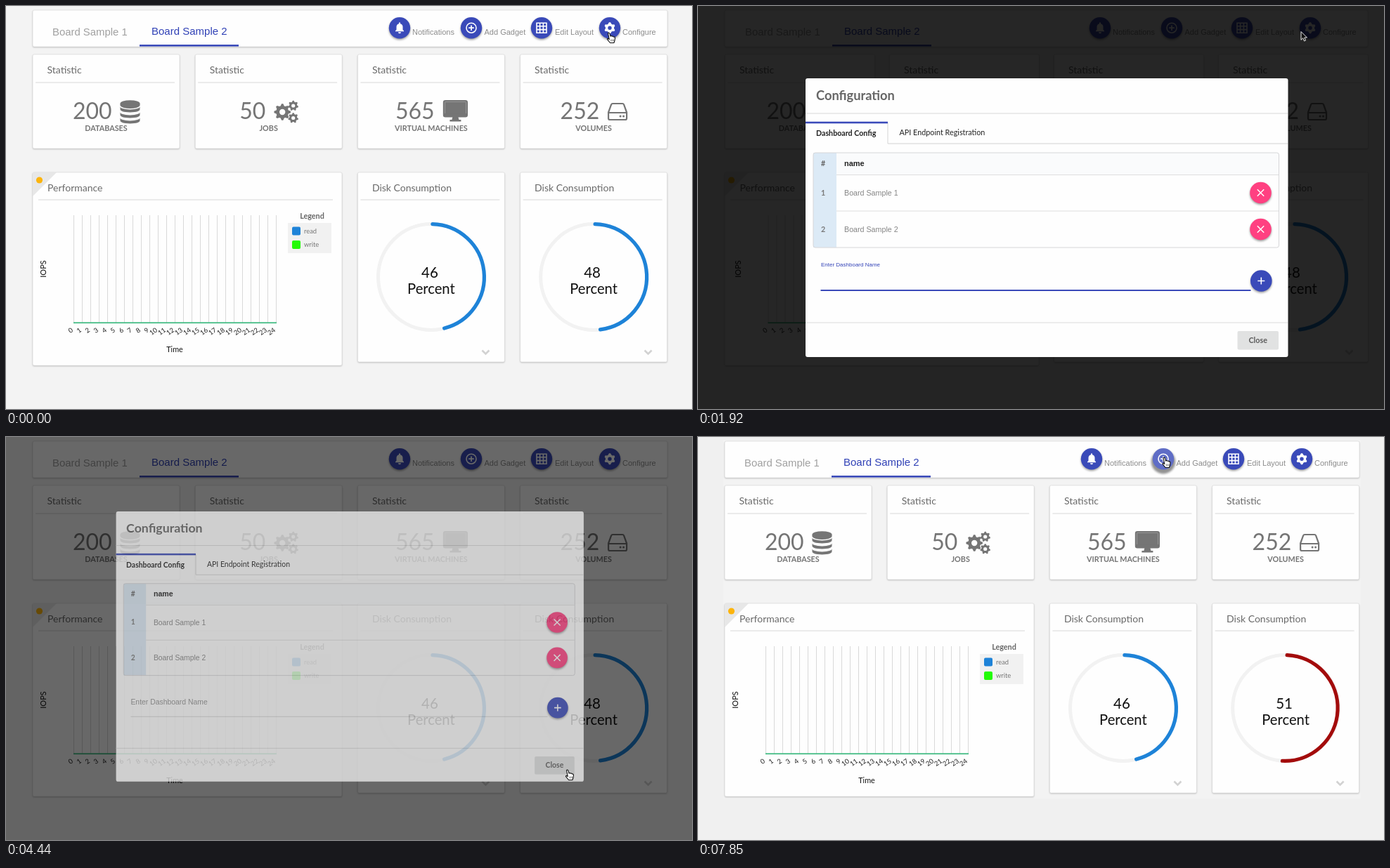
An HTML page for the animation above (8 s loop, 976x574 px).

```html
<!DOCTYPE html>
<html lang="en">
<head>
<meta charset="utf-8">
<title>Dashboard configuration</title>
<style>
html, body { margin: 0; width: 100%; height: 100%; overflow: hidden; background: #f3f3f3; }
svg { display: block; width: 976px; height: 574px; font-family: Lato, sans-serif; }
.sans { font-family: "Liberation Sans", Arial, sans-serif; }
</style>
</head>
<body>
<svg id="stage" viewBox="0 0 976 574"></svg>
<script>
const LOOP = 8000, TICK = 148.1;
const INDIGO = '#3a4ab9', PINK = '#ff4081', GREY = '#757575', BLUE = '#1e83d8';
const stage = document.getElementById('stage');

const DEFS = `<defs>
  <filter id="soft" x="-50%" y="-50%" width="200%" height="200%"><feGaussianBlur stdDeviation="1.6"/></filter>
  <filter id="edge" x="-5%" y="-5%" width="110%" height="110%"><feGaussianBlur stdDeviation="0.8"/></filter>
</defs>`;

// shape helpers
const text = (x, y, s, size, fill, extra = '') =>
  `<text x="${x}" y="${y}" font-size="${size}" fill="${fill}" ${extra}>${s}</text>`;
const rect = (x, y, w, h, fill, extra = '') =>
  `<rect x="${x}" y="${y}" width="${w}" height="${h}" fill="${fill}" ${extra}/>`;
const disc = (x, y, r, fill, extra = '') =>
  `<circle cx="${x}" cy="${y}" r="${r}" fill="${fill}" ${extra}/>`;
const stroke = (d, color, width = 1, extra = '') =>
  `<path d="${d}" fill="none" stroke="${color}" stroke-width="${width}" ${extra}/>`;
const shape = (d, fill, extra = '') => `<path d="${d}" fill="${fill}" ${extra}/>`;
const at = (x, y, body) => `<g transform="translate(${x} ${y})">${body}</g>`;
const MID = 'text-anchor="middle"', BOLD = 'font-weight="700"', SANS = 'class="sans"';

function card(x, y, right, bottom) {
  const w = right - x, h = bottom - y;
  return rect(x, y + 1, w, h, '#000', 'rx="2" opacity=".25" filter="url(#edge)"') +
    rect(x, y, w, h, '#fefefe', 'rx="2" stroke="#dcdcdc" stroke-width=".7"');
}

function gear(x, y, r, teeth, hole, fill) {
  let d = '';
  for (let i = 0; i < teeth * 4; i++) {
    const a = (i - 0.5) / (teeth * 4) * 2 * Math.PI, q = i % 4 < 2 ? r : r * 0.76;
    d += (i ? 'L' : 'M') + (x + q * Math.sin(a)).toFixed(2) + ' ' + (y - q * Math.cos(a)).toFixed(2);
  }
  d += `ZM${x - hole} ${y}a${hole} ${hole} 0 1 0 ${2 * hole} 0a${hole} ${hole} 0 1 0 ${-2 * hole} 0Z`;
  return shape(d, fill, 'fill-rule="evenodd"');
}

// header
const BUTTONS = [
  [560, 578, 'Notifications', shape('M-6 5H6V4L4.5 2.5V-1.5C4.5-4 3-5.5 1-6V-7A1 1 0 0 0-1-7V-6C-3-5.5-4.5-4-4.5-1.5V2.5L-6 4ZM-2 6H2A2 2 0 0 1-2 6Z', '#fff')],
  [662, 680.5, 'Add Gadget', disc(0, 0, 7, 'none', 'stroke="#fff" stroke-width="1.6"') + stroke('M-3.8 0H3.8M0-3.8V3.8', '#fff', 1.7)],
  [762, 781, 'Edit Layout', stroke('M-7-7H7V7H-7ZM-2.4-7V7M2.4-7V7M-7-2.4H7M-7 2.4H7', '#fff', 1.6)],
  [859, 877, 'Configure', gear(0, 0, 8, 6, 2.7, '#fff')]
];

function roundButton(x, y, r, fill, icon, pressed) {
  const shadow = pressed ? disc(0, 4, r + 2, '#000', 'opacity=".42" filter="url(#soft)"')
    : disc(0, 1.8, r, '#000', 'opacity=".38" filter="url(#soft)"');
  return at(x, y, shadow + disc(0, 0, r, fill) + icon);
}

function headerBar(wide, pressed) {
  const dx = wide ? 12 : 0, tab = wide ? 1 : 0;
  let s = card(38, 6, wide ? 953 : 941, 58);
  s += text(66 + tab, 42, 'Board Sample 1', 14.9, '#a0a0a0', SANS);
  s += text(207 + tab, 41, 'Board Sample 2', 15, '#3041b6', SANS);
  s += rect(190 + tab, 55, 141, 2.6, INDIGO);
  BUTTONS.forEach(([x, tx, label, icon], i) => {
    s += roundButton(x + dx, 31.2, 15.2, pressed === i ? '#5f6dc6' : INDIGO, icon, pressed === i);
    s += text(tx + dx, 41, label, 11, '#8c8c8c', SANS);
  });
  return s;
}

// statistic cards; icons are placed from the card's centre
const database = [0, 1, 2].map(i => {
  const y = 143.5 + i * 8;
  return shape(`M20 ${y}q0 3 14 4q14-1 14-4v3.5q0 4-14 4.5q-14-.5-14-4.5Z`, GREY);
}).join('') + `<ellipse cx="34" cy="139" rx="14" ry="4.8" fill="${GREY}"/>` + shape('M20 139h28v3q-3 4-14 4t-14-4Z', GREY);
const cogs = gear(19.5, 151, 11.8, 8, 4.2, GREY) + gear(35, 142, 7.3, 7, 2.6, GREY) + gear(35, 159.5, 7.3, 7, 2.6, GREY);
const monitor = rect(18.2, 135.2, 32.6, 22, '#fefefe', `rx="2" stroke="${GREY}" stroke-width="2.6"`) +
  rect(18, 153, 33, 5, GREY) + rect(19.5, 136.5, 30, 17, GREY) + shape('M30.5 158h8l1 4h3v2.5h-16v-2.5h3Z', GREY);
const drive = stroke('M21 151.5L25 140.5Q25.5 139 27 139H41Q42.5 139 43 140.5L47 151.5V160Q47 162 45 162H23Q21 162 21 160ZM21 152H47', GREY, 2.2) +
  disc(38, 157, 1.5, GREY) + disc(42.5, 157, 1.5, GREY);
const STATS = [
  ['200', -47.5, 'DATABASES', database],
  ['50', -41.5, 'JOBS', cogs],
  ['565', -51, 'VIRTUAL MACHINES', monitor],
  ['252', -47.5, 'VOLUMES', drive]
];

function column(i, wide) {
  const x = wide ? 38.5 + 234 * i : 38 + 231.2 * i, w = wide ? 213 : 209;
  return { x, right: x + w, mid: x + w / 2 };
}

function statCard(i, wide) {
  const { x, right, mid } = column(i, wide), [value, vx, label, icon] = STATS[i];
  return card(x, 69, right, 203) + text(x + 20.5, 95.5, 'Statistic', 14, '#696969') +
    rect(x + 4, 108.5, right - x - 11, 1, '#d9d9d9') +
    text(mid + vx, 161, value, 32, GREY) + at(mid, 0, icon) +
    text(mid, 178, label, 10.8, GREY, MID + ' ' + BOLD);
}

function chartCard(wide) {
  const right = wide ? 485 : 478;
  let s = card(38, 237, right, 512) + shape('M38 237H72L38 271Z', '#e7e7e7') + disc(47.5, 248, 4.6, '#fcb40c');
  s += text(wide ? 59.5 : 59, 263.5, 'Performance', 14, '#696969') + rect(46, 275.5, right - 59, 1, '#d9d9d9');
  let chart = '';
  for (let h = 0; h <= 24; h++) {
    const x = 96 + 12 * h;
    chart += rect(x, 298, 1, 154, '#d9d9d9');
    chart += text(0, 0, h, 9.5, '#222', `text-anchor="end" transform="translate(${x} 463) rotate(-35)"`);
  }
  chart += rect(96, 450.3, 289, 1.8, '#45bd85');
  chart += text(240, 493, 'Time', 10.8, '#111', MID);
  chart += text(0, 0, 'IOPS', 11, '#111', MID + ' transform="translate(57 374.5) rotate(-90)"');
  chart += text(435.5, 302.5, 'Legend', 10.8, '#666', MID + ' ' + BOLD);
  chart += rect(401, 309, 62, 43, '#f1f1f1');
  [['read', BLUE], ['write', '#22fb05']].forEach(([label, color], i) => {
    chart += rect(407, 314.5 + 19.5 * i, 12, 12, color, 'rx="2"') + text(424, 324 + 19.3 * i, label, 9.4, '#777');
  });
  return s + at(wide ? 3.5 : 0, 0, chart);
}

function gaugeCard(i, wide, percent, color) {
  const { x, right, mid } = column(i, wide), r = 75.4, a = percent / 50 * Math.PI;
  const ex = mid + r * Math.sin(a), ey = 386 - r * Math.cos(a);
  const arc = `M${mid + 2} 310.6A${r} ${r} 0 ${percent > 50 ? 1 : 0} 1 ${ex} ${ey}`;
  return card(x, 237, right, 507) + text(x + 20.5, 263.5, 'Disk Consumption', 14, '#696969') +
    rect(x + 4, 275.5, right - x - 11, 1, '#d9d9d9') +
    disc(mid, 386, r, 'none', 'stroke="#f2f2f2" stroke-width="5"') +
    stroke(arc, color, 5.2, 'stroke-linecap="round"') +
    text(mid - 2, 386.5, percent, 20.5, '#111', MID) + text(mid, 410, 'Percent', 20.2, '#111', MID) +
    stroke(`M${right - 32} 490.5l5 5l5-5`, '#d2d2d2', 2.6);
}

function page(wide, pressed, alarm) {
  let s = headerBar(wide, pressed);
  for (let i = 0; i < 4; i++) s += statCard(i, wide);
  return s + chartCard(wide) + gaugeCard(2, wide, 46, BLUE) +
    (alarm ? gaugeCard(3, wide, 51, '#a30b0b') : gaugeCard(3, wide, 48, BLUE));
}

function dialog(focused, caret) {
  const cross = stroke('M-4.7-4.7L4.7 4.7M4.7-4.7L-4.7 4.7', '#fff', 1.5);
  const plus = stroke('M-5 0H5M0-5V5', '#fff', 1.6);
  let s = rect(153, 103, 686.5, 397, '#fefefe', 'rx="3"');
  s += text(168, 133.5, 'Configuration', 18.3, '#666', BOLD) + rect(153, 152.5, 686, 1, '#dadada');
  s += rect(270, 195.5, 569, 1, '#d4d4d4') + rect(269.5, 166, 1, 30, '#d4d4d4') + rect(153, 164.7, 117, 2.6, INDIGO);
  s += text(168, 185, 'Dashboard Config', 10.7, '#222', BOLD) + text(286.5, 184, 'API Endpoint Registration', 10.8, '#222');
  s += rect(197, 209, 629, 31, '#fafbfc') + rect(164, 209, 33, 135, '#dceaf6');
  s += rect(197, 240, 629, 1, '#dfdfdf') + rect(197, 291.5, 629, 1, '#dfdfdf');
  s += rect(164, 209, 662.5, 135, 'none', 'rx="3" stroke="#d6d6d8"');
  s += text(178, 228, '#', 10.7, '#666', MID + ' ' + BOLD) + text(208, 228, 'name', 11, '#222', SANS + ' ' + BOLD);
  for (let i = 0; i < 2; i++) {
    const y = 266 + 52 * i;
    s += text(178, y + 3.5, i + 1, 10.7, '#7a7a7a', MID + ' ' + BOLD);
    s += text(208, y + 3.7, 'Board Sample ' + (i + 1), 10.7, '#858585', SANS);
    s += roundButton(800.5, y, 15.3, PINK, cross);
  }
  if (focused) {
    s += text(175, 371.3, 'Enter Dashboard Name', 8, '#3444b8', SANS) + rect(174.5, 404, 612, 2, INDIGO);
    if (caret) s += rect(178, 382, 1, 14, '#888');
  } else {
    s += text(174.5, 387, 'Enter Dashboard Name', 10.75, '#909090', SANS) + rect(174.5, 404, 612, 1, '#d6d6d6');
  }
  s += roundButton(801.3, 391.5, 15.3, INDIGO, plus) + rect(153, 450.5, 686, 1, '#dcdcdc');
  return s + rect(767.5, 463, 58.5, 26.5, '#e1e2e2', 'rx="2"') + text(796.7, 480, 'Close', 10.8, '#5c5c5c', MID + ' ' + BOLD);
}

// pointer: tick, x, y, hand?
const PATH = [
  [0, 854.5, 37.5, 1], [1, 858, 37, 0], [3, 854.5, 37, 1], [8, 854.5, 37, 1], [9, 858, 36.5, 0],
  [15, 858, 36.5, 0], [20, 815, 270, 0], [21, 792, 313, 1], [22, 792, 313, 1], [23, 797, 350, 0],
  [25, 798, 440, 0], [26, 795.5, 473.5, 1], [30, 795.5, 473.5, 1], [31, 799, 472, 0],
  [32, 787, 434, 0], [34, 740, 216, 0], [37, 592, 34, 0], [42, 605, 26, 0], [50, 660, 28.5, 1], [60, 660, 28.5, 1]
];

function pointer(k) {
  const i = PATH.findIndex(p => p[0] > k), a = PATH[i - 1], b = PATH[i];
  // the first changes of shape are jumps, not glides
  const q = k < 9 ? 0 : (k - a[0]) / (b[0] - a[0]);
  const body = a[3]
    ? shape('M2 1.3C2.8.2 4.2.6 4.5 1.8L5.5 5.6C6.5 4.6 7.6 5 8 5.9C9 5.2 10 5.7 10.2 6.7C11.2 6.2 12 7 12 8L11.6 11.5L10.4 15H5L1.1 10.2C.5 9.2 2 8.4 2.8 9.2L3.8 10Z', '#fff', 'stroke="#111" stroke-width="1.1" stroke-linejoin="round"') +
      stroke('M6.3 10v3M8.2 10v3M10 10v2.5', '#222', 0.6)
    : shape('M0 0V11.8L2.7 9.2L4.5 13.4L6.5 12.5L4.8 8.5H8.5Z', '#111', 'stroke="#fff" stroke-width=".9"');
  return at(a[1] + (b[1] - a[1]) * q, a[2] + (b[2] - a[2]) * q, body);
}

// cubic-bezier(.25, .1, .25, 1)
function ease(t) {
  if (t <= 0) return 0;
  if (t >= 1) return 1;
  const curve = (u, p, q) => 3 * u * (1 - u) ** 2 * p + 3 * u * u * (1 - u) * q + u ** 3;
  let lo = 0, hi = 1;
  for (let i = 0; i < 24; i++) {
    const u = (lo + hi) / 2;
    if (curve(u, 0.25, 0.25) < t) lo = u; else hi = u;
  }
  return curve(lo, 0.1, 1);
}

function render(k) {
  const t = k * TICK, closing = k >= 28, wide = k >= 10 && k < 30;
  const shown = closing ? 1 - ease((t - 4340) / 500) : ease((t - 1350) / 500);
  const scale = closing ? 0.9 + 0.1 * shown : 0.8 + 0.2 * shown;
  const pressed = k === 8 || k === 9 ? 3 : k >= 53 ? 1 : -1;
  let s = DEFS + rect(0, 0, 976, 574, k >= 33 ? '#f0f0f0' : '#f3f3f3');
  if (k >= 33) s += rect(36, 4, 907, 511, '#f3f3f3');
  s += page(wide, pressed, k >= 46);
  if (shown > 0) {
    const caret = (Math.floor((k - 20.5) / 3.5) & 1) === 0;
    s += rect(0, 0, 976, 574, '#000', `opacity="${0.85 * shown}"`);
    s += `<g opacity="${shown}" transform="translate(${wide ? 496 : 489} 202) scale(${scale}) translate(-496 -202)">` +
      dialog(k >= 13 && k < 28, caret) + '</g>';
  }
  stage.innerHTML = s + pointer(k);
}

let last = -1;
function frame() {
  const k = Math.floor((performance.now() % LOOP + 8) / TICK);
  if (k !== last) render(last = k);
  requestAnimationFrame(frame);
}
frame();
</script>
</body>
</html>
```
